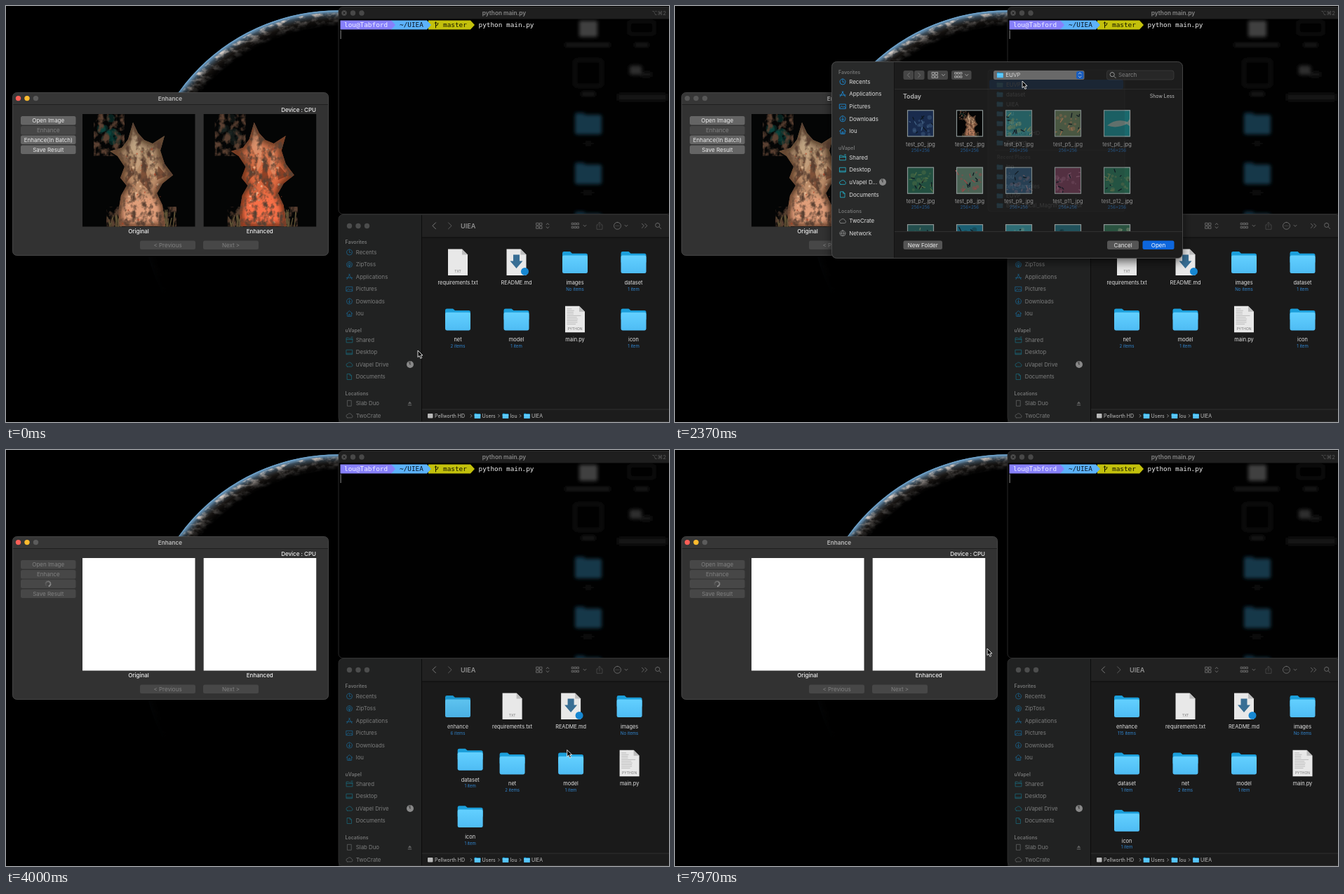
Recreate the animation shown at these times as an HTML page. Size 945 px wide and 593 px high, loop 8 s.

```html
<!DOCTYPE html>
<html lang="en">
<head>
<meta charset="utf-8">
<title>Batch enhance</title>
<style>
html, body { margin: 0; width: 100%; height: 100%; overflow: hidden; background: #000; }
svg { display: block; width: 100vw; height: 100vh; }
text { font-family: Inter, "DejaVu Sans", sans-serif; white-space: pre; }
.mono { font-family: "DejaVu Sans Mono", monospace; }
</style>
</head>
<body>
<svg id="stage" viewBox="0 0 945 593" xmlns="http://www.w3.org/2000/svg"></svg>
<script>
const LOOP = 8000;
const BLUE = '#1b95e8', DIM_BLUE = '#1a628c', GREY = '#8a8b8b';

// ---- drawing helpers ----
const rect = (x, y, w, h, fill, r = 0, extra = '') =>
  `<rect x="${x}" y="${y}" width="${w}" height="${h}" rx="${r}" fill="${fill}" ${extra}/>`;
const dot = (x, y, r, fill, extra = '') => `<circle cx="${x}" cy="${y}" r="${r}" fill="${fill}" ${extra}/>`;
const path = (d, fill, extra = '') => `<path d="${d}" fill="${fill}" ${extra}/>`;
const line = (d, color, w = 1) =>
  path(d, 'none', `stroke="${color}" stroke-width="${w}" stroke-linecap="round" stroke-linejoin="round"`);
const text = (x, y, s, size, fill, anchor = 'start', extra = '') =>
  `<text x="${x}" y="${y}" font-size="${size}" fill="${fill}" text-anchor="${anchor}" ${extra}>${s}</text>`;
const at = (x, y, body, extra = '') => `<g transform="translate(${x} ${y})" ${extra}>${body}</g>`;
const group = (id, body, extra = '') => `<g id="${id}" ${extra}>${body}</g>`;
const BOLD = 'font-weight="600"';

function random(seed) {
  return () => (seed = (seed * 16807) % 2147483647) / 2147483647;
}

const ring = r => `M0-${r}A${r} ${r} 0 1 0 0 ${r}A${r} ${r} 0 1 0 0-${r}`;
const glyphs = {
  clock: ring(4) + 'M0-2.3V.4H1.8',
  waves: ring(4) + ring(2) + 'M0 0V3.5',
  apps: 'M-3.6 3.6L.7-3.8M3.6 3.6L-.7-3.8M-4.2 1.4H4.2',
  picture: 'M-4.3-3.2H4.3V3.2H-4.3ZM-4 2.2L-1.4-.6L.6 1.4L2-.2L4 2.2',
  down: ring(4) + 'M0-2V2M-1.6.5L0 2L1.6.5',
  home: 'M-4.4 0L0-4L4.4 0M-3.1-1V3.8H3.1V-1M-.9 3.8V1H.9V3.8',
  shared: 'M-4.4 3.4V-3H-1.2L-.2-2H4.4V3.4ZM-4.4-.6H4.4M2.5-4H4.6',
  desktop: 'M-4.2-3.3H4.2V3.2H-4.2ZM-4.2 1.6H4.2',
  cloud: 'M-2.8 3.1H2.8A2 2 0 0 0 3.1-.8A3 3 0 0 0-2.3-1.6A2.4 2.4 0 0 0-2.8 3.1Z',
  doc: 'M-3-4H.7L3-1.6V4H-3ZM.7-4V-1.6H3',
  slab: 'M-2.7-4H2.7V4H-2.7Z',
  globe: ring(4) + 'M-4 0H4M0-4Q-3.4 0 0 4Q3.4 0 0-4',
  lens: 'M1.9 1.9L4.2 4.2M-.8-4A3.1 3.1 0 1 0-.8 2.2A3.1 3.1 0 1 0-.8-4',
  left: 'M2-4.5L-2.5 0L2 4.5', right: 'M-2-4.5L2.5 0L-2 4.5',
  drop: 'M-2-1L0 1L2-1', updown: 'M-1.9-1.5L0-3.6L1.9-1.5M-1.9 1.5L0 3.6L1.9 1.5',
  grid: 'M-4-4H-.8V-.8H-4ZM.8-4H4V-.8H.8ZM-4 .8H-.8V4H-4ZM.8 .8H4V4H.8Z',
  rows: 'M-5-4H-2.6V-1.6H-5ZM-1.2-4H1.2V-1.6H-1.2ZM2.6-4H5V-1.6H2.6ZM-5 1H-2.6V3.4H-5ZM-1.2 1H1.2V3.4H-1.2ZM2.6 1H5V3.4H2.6Z',
  share: 'M-2-1.4H-4V5H4V-1.4H2M0 2V-5M-2-3L0-5L2-3',
  more: ring(5) + 'M-2.2 0H-2.1M0 0H.1M2.2 0H2.3',
  forward: 'M-3.6-3L-.6 0L-3.6 3M.8-3L3.8 0L.8 3',
};
const glyph = (name, x, y, color, w = .8) => at(x, y, line(glyphs[name], color, w));

const folder = (s = 1) => `<g transform="scale(${s})">` +
  path('M-18-13Q-18-15.3-15.5-15.3H-7L-4-12.7H15.5Q18-12.7 18-10V0H-18Z', '#1b9fdb') +
  rect(-18, -10, 36, 25.6, 'url(#folder)', 2.3) + '</g>';

const sheet = (tag, inner = '') =>
  path('M-14-19H6L14-11V18.5H-14Z', '#e8e8e8') + path('M6-19V-11H14Z', '#bcbcbc') +
  inner + text(0, 15, tag, 5, '#777', 'middle');
const codeLines = () => {
  const rnd = random(11);
  let d = '';
  for (let y = -15; y < 9; y += 2.4) d += `M-11 ${y}h${y < -9 ? 6 + rnd() * 8 : 8 + rnd() * 13}`;
  return line(d, '#aaa', .7);
};
const icons = {
  folder: folder(),
  txt: sheet('TXT'),
  py: sheet('PYTHON', codeLines()),
  md: sheet('', path('M-4.5-11H4.5V-2H9L0 8.5L-9-2H-4.5Z', '#386e94') + dot(12, 13, 5.5, '#1687d2')),
};

// ---- pictures ----
const BODY = 'M72 12L79 27L88 37L100 42L117 31L111 52L117 71L129 87L114 99L106 113L114 130L118 160H53L51 140L55 116L63 102L54 91L60 75L50 60L39 53L56 48L65 36Z';

function coral(top, mid, low, plant, id) {
  const rnd = random(29);
  let spots = '', rocks = '', plants = '';
  for (let i = 0; i < 60; i++) {
    const y = 50 + rnd() * 106, half = y > 100 ? 28 : 22;
    spots += dot(85 + (rnd() - .5) * 2 * half, y, .6 + rnd() * 1.4, rnd() < .6 ? '#b23f24' : '#f3cda8', 'opacity=".6"');
  }
  for (let i = 0; i < 18; i++) {
    const a = rnd() * 6.3, r = rnd() * 17;
    plants += dot(38 + Math.cos(a) * r, 27 + Math.sin(a) * r * 1.3, 3 + rnd() * 5, plant, 'opacity=".4"');
  }
  for (let i = 0; i < 34; i++) {
    const x = i % 2 ? 114 + rnd() * 16 : 38 + rnd() * 18;
    rocks += `M${x} 160L${x + rnd() * 8 - 4} ${136 + rnd() * 20}`;
  }
  return `<linearGradient id="${id}" x2="0" y2="1"><stop stop-color="${top}"/><stop offset=".5" stop-color="${mid}"/><stop offset="1" stop-color="${low}"/></linearGradient>` +
    `<clipPath id="${id}-body"><path d="${BODY}"/></clipPath>` +
    rect(0, 0, 160.5, 160.5, '#040505') +
    `<g filter="url(#soft)">` + plants + line(rocks, '#5d5134', 1.4) + path(BODY, `url(#${id})`) +
    `<g clip-path="url(#${id}-body)">` + path(BODY, 'none', 'stroke="#2a0f06" stroke-width="11" opacity=".55" filter="url(#shade)"') +
    path('M72 18L68 46L78 66L72 90L82 72L83 46ZM100 48L93 76L103 94L102 70Z', '#ffe0bc', 'opacity=".22"') +
    path('M60 55L70 76L62 98L74 84ZM86 64L82 96L97 112L91 84ZM108 74L120 88L106 94Z', '#4a1a0c', 'opacity=".5"') +
    `<ellipse cx="84" cy="136" rx="24" ry="20" fill="${low}" opacity=".75" filter="url(#shade)"/></g>` + spots + '</g>' +
    `<g filter="url(#grain)">` + path(BODY, '#000') + rect(16, 0, 44, 60, '#000') + rect(34, 132, 100, 28.5, '#000') + '</g>';
}

function thumb(i, a, b) {
  const rnd = random(71 + i * 97);
  let s = rect(0, 0, 38, 38, a);
  if (i === 3) s += path('M5 22Q18 11 34 17L37 13V23L33 20Q18 27 5 22Z', b);
  else for (let k = 0; k < 24; k++) {
    const x = 3 + rnd() * 32, y = 7 + rnd() * 28;
    s += k % 2 ? dot(x, y, 1 + rnd() * 2.5, b, 'opacity=".45"')
      : line(`M${x} ${y}l${rnd() * 10 - 5} ${rnd() * 12 - 6}`, k % 4 ? '#101c26' : b, 1.3);
  }
  return s + rect(0, 0, 38, 38, '#000', 0, 'opacity=".12"');
}

// ---- desktop ----
const earth = `<g mask="url(#lit)">` +
  dot(473, 285.5, 279, 'url(#globe)') +
  dot(473, 285.5, 276, '#fff', 'filter="url(#clouds)"') +
  dot(473, 285.5, 278.7, 'none', 'stroke="#6ea3cc" stroke-width="1.2"') + '</g>';

const lights = (x, y, colors, gap = 12.5) => colors.map((c, i) => dot(x + i * gap, y, 3.7, c)).join('');

const blurred = `<g filter="url(#blur)">` +
  rect(817, 21, 26, 23, '#414141', 2) + rect(797, 53, 64, 5, '#1d1d1d') +
  rect(888, 22, 36, 18, 'none', 3, 'stroke="#1f1f1f" stroke-width="2"') + rect(896, 53, 20, 5, '#1a1a1a') +
  rect(811, 77, 38, 37, 'none', 3, 'stroke="#222" stroke-width="2"') + rect(820, 123, 20, 5, '#1a1a1a') +
  rect(889, 85, 17, 13, '#2e2e2e', 2) + rect(905, 94, 15, 7, '#161616') + rect(872, 125, 70, 10, '#141414') +
  [167, 238, 308].map(y => rect(811, y - 15, 14, 6, '#0d2c3c', 2) + rect(811, y - 12, 38, 28, '#123749', 3)).join('') +
  rect(824, 194, 12, 4, '#141414') + rect(821, 264, 16, 4, '#141414') + '</g>';

const mono = (x, s, fill) => text(x, 30.3, s, 9.4, fill, 'start', 'class="mono"');
const terminal = `<g clip-path="url(#term)">` + rect(474, 1, 471, 296, '#010101') + blurred +
  rect(474, 1, 471, 17.5, '#1f1f1f') + lights(482, 10, ['#4e4e4e', '#484848', '#484848']) +
  line('M480.6 8.6l2.8 2.8m0-2.8l-2.8 2.8', '#111', .8) +
  text(710, 13, 'python main.py', 8.3, '#858585', 'middle', BOLD) +
  text(941, 12.5, '⌥⌘2', 7.8, '#585858', 'end') +
  path('M602 20.5H662L668 27L662 33.5H602Z', '#c3c10c') +
  path('M549 20.5H600L606 27L600 33.5H549Z', '#5cb2fb') +
  path('M476.5 20.5H549L555 27L549 33.5H476.5Z', '#8780fb') +
  mono(482, 'lou@Tabford', '#f2f0ff') + mono(561, '~/UIEA', '#08141e') + mono(623, 'master', '#141400') +
  line('M612.5 23V31M612.5 28.5Q616 28 616 24.5M611 24.5L612.5 23L614 24.5', '#141400') +
  mono(673.5, 'python main.py', '#f0f0f0') + rect(476.6, 34.5, 1, 12.5, '#8a8a8a') + '</g>' +
  rect(474, 1.5, 474, 295, 'none', 6, 'stroke="#333" stroke-width=".8"');

const sideRow = (x, y, [icon, label], tint, color, size) =>
  glyph(icon, x, y, tint) + text(x + 9.3, y + 2.8, label, size, color);
const pie = (x, y) => dot(x, y, 5, '#898989') + line(`M${x} ${y}V${y - 4.5}M${x} ${y}L${x - 2} ${y - 4}`, '#333', .8);

const favorites = [['clock', 'Recents'], ['waves', 'ZipToss'], ['apps', 'Applications'], ['picture', 'Pictures'], ['down', 'Downloads'], ['home', 'lou']];
const synced = [['shared', 'Shared'], ['desktop', 'Desktop'], ['cloud', 'uVapel Drive'], ['doc', 'Documents']];
const finderRows = (rows, y, tint) => rows.map((r, i) => sideRow(489.5, y + i * 17.5, r, tint, '#7c7d7d', 7.8)).join('');
const head = (x, y, s, c = '#747575') => text(x, y, s, 7, c, 'start', BOLD);
const crumb = (x, s) => at(x - 6.5, 584.3, folder(.24)) + text(x, 586.8, s, 7, '#c0c0c0');

const files = [['txt', 'requirements.txt', ''], ['md', 'README.md', ''], ['folder', 'images', 'No items'], ['folder', 'dataset', '1 item'],
  ['folder', 'net', '2 items'], ['folder', 'model', '1 item'], ['py', 'main.py', ''], ['folder', 'icon', '1 item']];
const file = ([icon, name, sub], id) => group(id, icons[icon] +
  text(0, 31.5, name, 7.4, '#e2e2e2', 'middle') + text(0, 40.3, sub, 6.1, '#3186d0', 'middle', `id="${id}-sub"`));

const finder = `<g clip-path="url(#find)">` + rect(474, 297, 471, 296, '#1a1a1a') +
  rect(474, 297, 118, 296, '#212222') + rect(592.5, 297, 353, 33, '#212121') +
  rect(592, 297, 1, 296, '#0c0c0c') + rect(593, 329.5, 352, 1, '#0c0c0c') +
  lights(489.5, 313.5, Array(3).fill('#4c4d4d')) +
  head(483.5, 339.3, 'Favorites') + finderRows(favorites, 351, DIM_BLUE) +
  head(483.5, 464.8, 'uVapel') + finderRows(synced, 476, '#1a6577') + pie(576, 511) +
  head(483.5, 554.6, 'Locations') + finderRows([['slab', 'Slab Duo'], ['cloud', 'TwoCrate']], 566.3, '#606161') +
  path('M572.8 567L575.5 563.8L578.2 567ZM572.8 568.2H578.2V569.4H572.8Z', '#606161') +
  glyph('left', 610.5, 313.3, '#7c7c7c', 1) + glyph('right', 632.5, 313.3, '#5c5c5c', 1) +
  text(648, 316.6, 'UIEA', 9.2, '#8f8f8f', 'start', BOLD) +
  [['grid', 760], ['updown', 772], ['rows', 811.5], ['drop', 825], ['share', 846], ['more', 871.5], ['drop', 884], ['forward', 910], ['lens', 929.5]]
    .map(([n, x]) => glyph(n, x, 313.3, n === 'share' ? '#4c4c4c' : '#767676')).join('') +
  file(['folder', 'enhance', ''], 'enhance') + files.map((f, i) => file(f, 'file' + i)).join('') +
  rect(593, 575, 352, 18, '#1c1c1c') + rect(593, 574.5, 352, 1, '#2e2e2e') +
  rect(601, 581, 7.5, 6.5, '#b9b9b9', 1) + text(611, 586.8, 'Pellworth HD', 7, '#c0c0c0') +
  [663, 702.5, 733].map(x => `<g transform="translate(${x} 584.3) scale(.4)">${line(glyphs.right, '#aaa', 2)}</g>`).join('') +
  crumb(678.5, 'Users') + crumb(718.5, 'lou') + crumb(749, 'UIEA') + '</g>' +
  rect(474, 297.5, 474, 295, 'none', 6, 'stroke="#333" stroke-width=".8"');

// ---- enhance window ----
const button = (x, y, w, label, fill = '#656565', color = '#ececec') =>
  rect(x, y, w, 12.5, fill, 2.5) + text(x + w / 2, y + 9.1, label, 8, color, 'middle');
const offButton = (x, y, w, label) => button(x, y, w, label, '#474747', '#808080');
const caption = (x, y, s, anchor = 'middle') => text(x, y, s, 8, '#f0f0f0', anchor, 'font-weight="500"');
const rowsY = [157, 171, 184.6, 198.4];
const labels = ['Open Image', 'Enhance', 'Enhance(In Batch)', 'Save Result'];
const rays = () => {
  let s = '';
  for (let i = 0; i < 12; i++) {
    s += `<path d="M0-2.6V-4.4" transform="rotate(${i * 30})" stroke="#bdbdbd" stroke-width="1.3" opacity="${(i / 12).toFixed(2)}"/>`;
  }
  return s;
};

const app = `<g filter="url(#shadow)">` + rect(9.5, 123.5, 450, 232, '#323232', 6, 'stroke="#4e4e4e" stroke-width=".8"') + '</g>' +
  path('M10 140V129.5Q10 124 15.5 124H453.5Q459 124 459 129.5V140Z', '#363636') + rect(10, 140, 449, 1, '#202020') +
  group('lit-bar', lights(17.5, 131.6, ['#fe5f57', '#febb2e', '#5c5c5c'])) + group('dim-bar', lights(17.5, 131.6, Array(3).fill('#575757'))) +
  text(234, 134.6, 'Enhance', 8.2, '#bcbcbc', 'middle', BOLD) + caption(442, 151.2, 'Device : CPU', 'end') +
  group('idle', labels.map((s, i) => (i === 1 ? offButton : button)(21, rowsY[i], 78.5, s)).join('') +
    at(109, 154, coral('#a49678', '#b58a66', '#e5a07c', '#0d4a43', 'c1')) +
    at(281.7, 154, coral('#c98561', '#d9693f', '#fb7149', '#1c2522', 'c2'))) +
  group('busy', labels.map((s, i) => offButton(21, rowsY[i], 78.5, i === 2 ? '' : s)).join('') +
    rect(109, 154, 160.5, 160.5, '#fff') + rect(281.7, 154, 160.5, 160.5, '#fff') +
    at(60, 190.8, group('spin', rays()))) +
  caption(189, 324.3, 'Original') + caption(361.8, 324.3, 'Enhanced') +
  offButton(191, 334.6, 79, '&lt; Previous') + offButton(281, 334.6, 79, 'Next &gt;');

// ---- open dialog ----
const tones = [['#1d3158', '#4c6f96'], ['', ''], ['#2b767b', '#8a9d6b'], ['#5a6c50', '#ba875e'], ['#1d777c', '#7a8e88'],
  ['#275a49', '#60804e'], ['#547060', '#ab504f'], ['#2c4c66', '#796a78'], ['#66384f', '#95617a'], ['#286650', '#758658'],
  ['#285958', '#7a9070'], ['#1e6b82', '#173c43'], ['#347c85', '#6c9b90'], ['#255c67', '#14353e'], ['#305e49', '#a3ad91']];
const ids = [0, 2, 3, 5, 6, 7, 8, 9, 11, 12];
const thumbs = tones.map(([a, b], i) => {
  const x = 350 + (i % 5) * 70, y = 148.3 + Math.floor(i / 5) * 81.4;
  const pic = i === 1 ? `<g transform="scale(.2368)">${coral('#9f8668', '#a87f60', '#b77c5e', '#12302c', 'c3')}</g>`
    : thumb(i > 1 ? i - 1 : i, a, b);
  return at(x - 19, y, pic + rect(.5, .5, 37, 37, 'none', 0, 'stroke="#8b9594" stroke-width="1.2"')) +
    (i < 10 ? text(x, y + 51.2, `test_p${ids[i]}_.jpg`, 7.4, '#9c9c9c', 'middle') +
      text(x, y + 59.3, '256×256', 6.1, '#235b93', 'middle') : '');
}).join('');

const dialogRows = (rows, y, tint = BLUE) => rows.map((r, i) => sideRow(239, y + i * 17.6, r, tint, '#dedede', 7.9)).join('');
const menuItem = (y, s) => at(463, y, folder(.24)) + text(472, y + 2.8, s, 7.8, '#d6d6d6');
const menu = group('menu', rect(446, 91, 195, 202, '#2b2c2d', 4, 'stroke="#555" stroke-width=".7"') +
  rect(448, 105, 191, 13.6, '#1761c4', 3) +
  ['Inp', 'EUVP', 'dataset', 'UIEA', 'lou', 'Users', 'Pellworth HD', 'Tabford'].map((s, i) => menuItem(98.4 + i * 13.8, s)).join('') +
  rect(456, 205, 175, .8, '#4c4c4c') + text(459, 218.4, 'Recent Places', 7, '#888', 'start', BOLD) +
  ['Inp', 'lou', 'test_samples', 'EUVP', 'Basic_Local_Magnifying_Tool'].map((s, i) => menuItem(229.5 + i * 13.7, s)).join(''));

const dialog = group('dialog', `<g filter="url(#shadow)">` + rect(223.5, 79.5, 500, 280, '#1d1d1d', 7) + '</g>' +
  path('M312 79.5V359.5H230Q223.5 359.5 223.5 353V86Q223.5 79.5 230 79.5Z', '#292a2a') +
  rect(312, 80, 1, 279, '#121212') + rect(313, 118, 410, .8, '#303030') + rect(313, 321.3, 410, .8, '#383838') +
  head(233, 96.7, 'Favorites') + dialogRows(favorites.filter(f => f[0] !== 'waves'), 108) +
  head(233, 204.5, 'uVapel') + dialogRows(synced.map(r => r[0] === 'cloud' ? ['cloud', 'uVapel D...'] : r), 216, '#22b4cf') + pie(296, 251) +
  head(233, 295, 'Locations') + dialogRows([['cloud', 'TwoCrate'], ['globe', 'Network']], 306.4, GREY) +
  rect(325.5, 92, 14.5, 13, '#464646', 2.5) + rect(341, 92, 14.5, 13, '#464646', 2.5) +
  `<g transform="translate(333 98.5) scale(.7)">${line(glyphs.left, '#7a7a7a', 1.4)}</g><g transform="translate(348 98.5) scale(.7)">${line(glyphs.right, '#7a7a7a', 1.4)}</g>` +
  rect(360, 92, 29, 13, '#464646', 2.5) + rect(394, 92, 28.5, 13, '#464646', 2.5) +
  glyph('grid', 370.5, 98.5, '#bbb') + glyph('rows', 404, 98.7, '#bbb') + glyph('drop', 382.5, 98.5, '#bbb') + glyph('drop', 415.8, 98.5, '#bbb') +
  rect(454, 92, 129.5, 13, '#545454', 2.5, 'id="combo"') + at(463.5, 98.4, folder(.25)) +
  text(471.3, 101.3, 'Inp', 7.9, '#ededed', 'start', 'id="place"') + rect(572, 93, 10.5, 11, '#1766d8', 2.5) +
  glyph('updown', 577.2, 98.5, '#fff') +
  rect(615.5, 92, 95.5, 13, '#272727', 3, 'stroke="#414141" stroke-width=".7"') + glyph('lens', 624, 98.5, '#c6c6c6') + text(632, 101.4, 'Search', 7.9, '#858585') +
  text(325, 131.6, 'Today', 8.8, '#b6b6b6', 'start', BOLD) + text(712, 130.9, 'Show Less', 6.9, '#bdbdbd', 'end') +
  group('bar', rect(718, 120, 4.5, 15, '#8e8e8e', 2.2)) +
  group('thumbs', thumbs, 'clip-path="url(#list)"') +
  group('parent', rect(327, 145, 46, 44, '#3d3d3d', 4, 'id="pick"') + at(350, 167, folder()) + text(350, 199.5, 'Inp', 7.4, '#e2e2e2', 'middle')) +
  button(325.5, 334.6, 55.5, 'New Folder', '#555') + button(616, 334.6, 45, 'Cancel', '#555') + button(666.5, 334.6, 45, 'Open', '#0d66dd', '#fff') +
  rect(223.5, 79.5, 500, 280, 'none', 7, 'stroke="#555" stroke-width=".8"') + menu);

const pointer = group('pointer', path('M0 0V9.6L2.2 7.6L3.9 11.4L5.7 10.6L4 7H7Z', '#050505', 'stroke="#f2f2f2" stroke-width=".9" stroke-linejoin="round"'));

const defs = `<defs>
<clipPath id="term"><rect x="474" y="1.5" width="480" height="295" rx="6"/></clipPath>
<clipPath id="find"><rect x="474" y="297.5" width="480" height="300" rx="6"/></clipPath>
<clipPath id="list"><rect x="313" y="119" width="410" height="202"/></clipPath>
<linearGradient id="folder" x2="0" y2="1"><stop stop-color="#63d0ff"/><stop offset="1" stop-color="#4ebcf4"/></linearGradient>
<radialGradient id="globe"><stop offset=".9" stop-color="#16110e"/><stop offset=".95" stop-color="#3d352f"/><stop offset=".98" stop-color="#44596a"/><stop offset="1" stop-color="#6fa3cc"/></radialGradient>
<radialGradient id="day" gradientUnits="userSpaceOnUse" cx="485" cy="303" r="300"><stop offset=".915" stop-color="#000"/><stop offset=".95" stop-color="#555"/><stop offset=".985" stop-color="#fff"/></radialGradient>
<linearGradient id="dusk" gradientUnits="userSpaceOnUse" x1="0" y1="110" x2="0" y2="412"><stop stop-opacity="0"/><stop offset=".7" stop-opacity=".86"/><stop offset="1"/></linearGradient>
<mask id="lit" maskUnits="userSpaceOnUse" x="0" y="0" width="945" height="593"><rect width="945" height="593" fill="url(#day)"/><rect width="945" height="593" fill="url(#dusk)"/></mask>
<filter id="clouds"><feTurbulence type="fractalNoise" baseFrequency=".08 .13" numOctaves="4" seed="8"/><feColorMatrix values="0 0 0 0 .66 0 0 0 0 .6 0 0 0 0 .56 3.2 0 0 0 -1.4"/><feComposite in2="SourceGraphic" operator="in"/></filter>
<filter id="grain"><feTurbulence type="fractalNoise" baseFrequency=".13 .1" numOctaves="3" seed="4"/><feColorMatrix values="0 0 0 0 .1 0 0 0 0 .05 0 0 0 0 .03 3.4 0 0 0 -1.45"/><feComposite in2="SourceGraphic" operator="in"/></filter>
<filter id="blur" x="-20%" y="-20%" width="140%" height="140%"><feGaussianBlur stdDeviation="2.6"/></filter>
<filter id="shade" x="-20%" y="-20%" width="140%" height="140%"><feGaussianBlur stdDeviation="3"/></filter>
<filter id="soft"><feGaussianBlur stdDeviation=".6"/></filter>
<filter id="shadow" x="-10%" y="-10%" width="120%" height="130%"><feDropShadow dx="0" dy="5" stdDeviation="7" flood-opacity=".6"/></filter>
</defs>`;

document.getElementById('stage').innerHTML =
  defs + rect(0, 0, 945, 593, '#000') + earth + terminal + finder + app + dialog + pointer;

// ---- motion ----
const $ = id => document.getElementById(id);
const show = (id, on) => $(id).setAttribute('visibility', on ? 'inherit' : 'hidden');
const move = (id, x, y) => $(id).setAttribute('transform', `translate(${x.toFixed(2)} ${y.toFixed(2)})`);
const clamp = v => Math.max(0, Math.min(1, v));
const ease = v => v * v * (3 - 2 * v);
const phase = (t, start, length) => clamp((t - start) / length);

const OPEN = 1140, MENU = 1900, CHOOSE = 2260, ENTER = 2490, PICK = 2820, START = 3350, REFLOW = 3800;
const track = [[0, 587, 491], [60, 587, 491], [880, 83, 190], [1120, 83, 190], [1370, 276, 181], [1820, 500, 96], [1960, 500, 96],
  [2180, 495, 107], [2470, 495, 107], [2750, 349, 165], [2900, 349, 165], [3230, 682, 335], [3560, 682, 335],
  [4150, 822, 445], [4260, 822, 445], [4900, 445, 283], [LOOP, 445, 283]];

function pointerAt(t) {
  const i = track.findIndex(k => k[0] > t);
  const [t0, x0, y0] = track[i - 1], [t1, x1, y1] = track[i];
  const k = ease((t - t0) / (t1 - t0));
  return [x0 + (x1 - x0) * k, y0 + (y1 - y0) * k];
}

const slot = i => [644 + (i % 4) * 83.5, 365.4 + Math.floor(i / 4) * 81.4];

function update(t) {
  const open = t >= OPEN && t < START, inside = t < ENTER;
  show('dialog', open);
  show('lit-bar', !open);
  show('dim-bar', open);
  show('idle', t < START);
  show('busy', t >= START);
  show('thumbs', inside);
  show('parent', !inside);
  show('bar', t < MENU);
  show('pick', t >= PICK && open);
  $('place').textContent = t < CHOOSE ? 'Inp' : 'EUVP';
  $('combo').setAttribute('fill', t >= MENU && inside ? '#747474' : '#545454');
  $('menu').setAttribute('opacity', t < MENU ? 0 : 1 - phase(t, CHOOSE, 130));
  $('spin').setAttribute('transform', `rotate(${((t - 3400) / 396 * 360 % 360).toFixed(1)})`);

  const k = ease(phase(t, REFLOW, 240));
  files.forEach((f, i) => {
    const [x0, y0] = slot(i), [x1, y1] = slot(i + 1);
    move('file' + i, x0 + (x1 - x0) * k, y0 + (y1 - y0) * k);
  });
  move('enhance', ...slot(0));
  $('enhance').setAttribute('opacity', k);
  const count = Math.max(1, Math.floor(37.3 + (t - 5130) * 78 / 2840));
  $('enhance-sub').textContent = count === 1 ? '1 item' : count + ' items';
  move('pointer', ...pointerAt(t));
}

const begin = performance.now();
function frame(now) {
  update(Math.max(0, now - begin) % LOOP);
  requestAnimationFrame(frame);
}
update(0);
requestAnimationFrame(frame);
</script>
</body>
</html>
```
